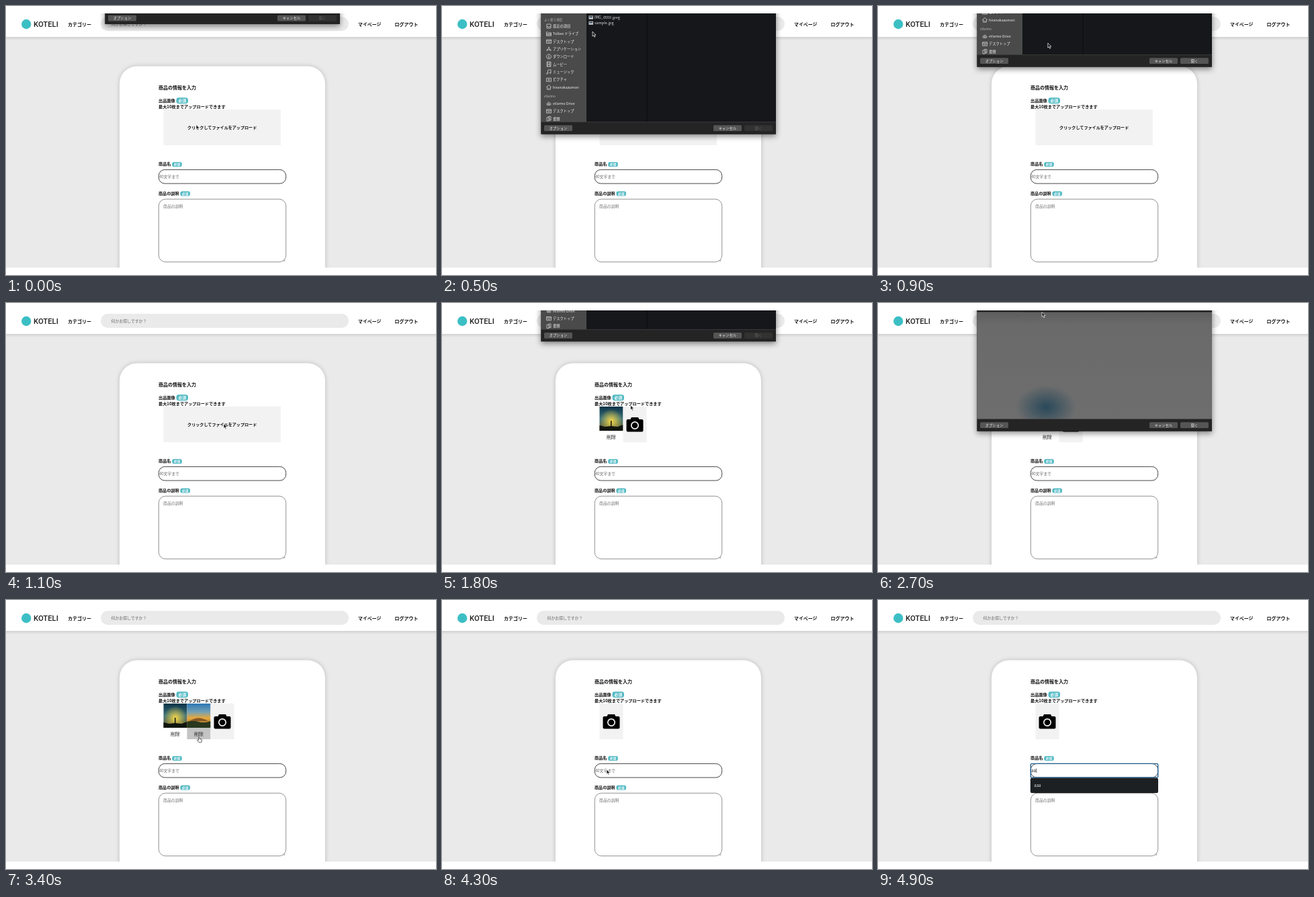
Write an HTML page that moves like this. It is 640 px wide and 400 px high and loops after 5 s.

```html
<!DOCTYPE html>
<html>
<head>
<meta charset="utf-8">
<style>
html, body { margin: 0; width: 100%; height: 100%; overflow: hidden; background: #fff; }
svg { display: block; width: 100vw; height: 100vh; font-family: "Noto Sans CJK JP", "Noto Sans CJK", sans-serif; }
.card { filter: drop-shadow(0 0 3px #0003); }
.sheet { filter: drop-shadow(0 3px 4px #0007); }
.line { fill: none; stroke: #d0d0d0; stroke-width: .8; }
</style>
</head>
<body>
<svg id="stage" viewBox="0 0 640 400"></svg>
<script>
const LOOP = 5000, STEP = 100, CELL = 35, LEFT = 234.5;

const rect = (x, y, w, h, fill, r = 0, more = '') =>
  `<rect x="${x}" y="${y}" width="${w}" height="${h}" rx="${r}" fill="${fill}" ${more}/>`;
// cy is the vertical middle of the glyphs
const text = (x, cy, size, str, fill = '#111', weight = 700, more = '') =>
  `<text x="${x}" y="${cy + size * .38}" font-size="${size}" fill="${fill}" font-weight="${weight}" ${more}>${str}</text>`;
const mid = 'text-anchor="middle"';
const badge = (x, cy, w, h, size) =>
  rect(x, cy - h / 2, w, h, '#52bac4', h * .4) + text(x + w / 2, cy, size, '必須', '#fff', 700, mid);
const group = (id, body, more = '') => `<g id="${id}" ${more}>${body}</g>`;
const button = (x, label, id) => group(id,
  rect(x, 177.3, 42, 8.8, '#555', 1.5) + text(x + 21, 181.7, 5.3, label, '#eee', 500, mid));

const icons = {
  tray: 'M1 1H7V7H1ZM1 4.5H3L3.5 5.5H4.5L5 4.5H7',
  folder: 'M.5 1.5H3L4 2.5H7.5V7H.5ZM1 4H7M1 5.5H7',
  desk: 'M.5 1.5H7.5V6.8H.5ZM.5 3H7.5M2 5H6',
  app: 'M4.5 .8L1 7.2M3.5 .8L7 7.2M.3 5.2H7.7',
  down: 'M4 .5A3.5 3.5 0 1 1 3.99 .5M4 2V6M2.5 4.5L4 6L5.5 4.5',
  film: 'M1 .5H7V7.5H1ZM2.5 .5V7.5M5.5 .5V7.5M2.5 4H5.5',
  music: 'M2.5 6.5V1.5L7 .7V5.5M2.5 6.5A1 1 0 1 1 2.4 6M7 5.5A1 1 0 1 1 6.9 5',
  photo: 'M.5 2H7.5V7H.5ZM2.8 4.5A1.2 1.2 0 1 0 5.2 4.5A1.2 1.2 0 1 0 2.8 4.5',
  home: 'M.3 4.2L4 .8L7.7 4.2M1.5 3.5V7.5H6.5V3.5M4 7.5V5',
  cloud: 'M2 6.3A1.4 1.4 0 0 1 2 3.6A2 2 0 0 1 5.7 3.2A1.6 1.6 0 0 1 6 6.3ZM2 5H6M3 4H5',
  docs: 'M1 2H4V7.3H1ZM3 .8H7V6.3H4M5 2V6'
};
const places = [
  ['tray', '最近の項目'], ['folder', 'Tolbex ドライブ'], ['desk', 'デスクトップ'],
  ['app', 'アプリケーション'], ['down', 'ダウンロード'], ['film', 'ムービー'],
  ['music', 'ミュージック'], ['photo', 'ピクチャ'], ['home', 'hiranokazumori']
];
const cloudPlaces = [['cloud', 'eVarmo Drive'], ['desk', 'デスクトップ'], ['docs', '書類']];
const list = (items, top) => items.map(([icon, label], i) => {
  const y = top + i * 11.32;
  return `<path class="line" d="${icons[icon]}" transform="translate(155 ${y - 4})"/>` +
    text(165, y, 5.25, label, '#f2f2f2', 500);
}).join('');
const file = (y, name) => rect(218.5, y - 2.5, 6.5, 5, '#d8d8d8') + rect(219.2, y - 1.8, 5.1, 2.2, '#456') +
  text(227, y, 5.5, name, '#e4e4e4', 400);

const page =
  rect(0, 46, 640, 343, '#eaeaea') + rect(0, 46, 640, 5, 'url(#edge)') +
  '<circle cx="30.2" cy="27" r="7.2" fill="#3cbfc4"/>' +
  text(41, 27, 11.3, 'KOTELI', '#222', 500, 'font-family="Roboto, sans-serif"') +
  text(92, 27, 7, 'カテゴリー') + rect(141, 16, 369, 21, '#eaeaea', 10.5) +
  text(156.5, 26.6, 5.9, '何かお探しですか？', '#666', 400) +
  text(524, 27, 6.9, 'マイページ') + text(578.5, 27, 7, 'ログアウト') +
  rect(169, 89.5, 306, 340, '#fff', 26, 'class="card"') +
  text(227, 121, 7, '商品の情報を入力') +
  text(227, 140.7, 6.2, '出品画像') + badge(253.5, 140.7, 17.5, 9, 6) +
  text(227, 149.6, 6.17, '最大10枚までアップロードできます') +
  group('upload', rect(LEFT, 154, 174.5, 53, '#f2f2f2') +
    text(321.7, 181, 6.08, 'クリックしてファイルをアップロード', '#111', 700, mid)) +
  ['sunset', 'dusk'].map((name, i) => group('photo' + i,
    rect(0, 190, CELL, 17, '#c4c4c4', 0, `id="hover${i}"`) + scene(name) +
    text(CELL / 2, 199, 7, '削除', '#222', 500, mid),
    `transform="translate(${LEFT + i * CELL})"`)).join('') +
  group('camera', rect(0, 154, CELL, 53, '#f2f2f2') +
    '<path d="M7 173H11L12.5 170H22.5L24 173H28Q30 173 30 175V189.500Q30 191.500 28 191.500H7Q5 191.500 5 189.500V175Q5 173 7 173Z"/>' +
    '<circle cx="17.5" cy="182" r="5.200" stroke="#f2f2f2" stroke-width="1.700"/>') +
  text(227, 235, 6.15, '商品名') + badge(247.3, 235.5, 14.5, 7, 4.8) +
  rect(227.3, 243.4, 189.4, 20.6, '#fff', 9, 'stroke="#333" stroke-width=".9"') +
  text(228, 253.7, 5.85, '40文字まで', '#666', 400, 'id="hint"') +
  text(227, 278.5, 6.1, '商品の説明') + badge(259.5, 279, 14.5, 7, 4.8) +
  rect(227.3, 287.2, 189.4, 93.4, '#fff', 10, 'stroke="#777" stroke-width=".8"') +
  text(234, 298, 5.9, '商品の説明', '#757575', 400) +
  '<path d="M412.500 380L415.500 377M414 380L415.500 378.500" stroke="#777" stroke-width=".6"/>' +
  group('focus', rect(227.3, 243.4, 189.4, 20.6, 'none', 1.5, 'stroke="#24608f" stroke-width="1.4"')) +
  text(228, 253.7, 6, '', '#111', 400, 'id="typed"') +
  rect(0, 250.5, .6, 6.5, '#111', 0, 'id="caret"') +
  group('suggest', rect(226.8, 264.7, 190.2, 22.3, '#1c2022', 2) + text(232.3, 276, 6, 'aaa', '#eee', 400));

const sheet =
  rect(147.5, 0, 349.5, 190.5, '#15171a') + rect(147.5, 0, 67.5, 172.5, '#4a4a4a') +
  rect(304.8, 0, .6, 172, '#08090a') +
  text(152, 20, 4.5, 'よく使う項目', '#bbb', 500) + list(places, 30) +
  text(152, 134.7, 4.7, 'eVarmo', '#bbb', 500) + list(cloudPlaces, 145) +
  group('files', file(17, 'IMG_0559.jpeg') + file(25.2, 'sample.jpg')) +
  group('zoom', rect(147.5, 11, 349.5, 2.5, '#222') + rect(147.5, 13.5, 349.5, 160, 'url(#grey)') +
    rect(205, 108, 90, 65, 'url(#glow)')) +
  rect(147.5, 172.5, 349.5, 18, '#242424') + rect(147.5, 172.3, 349.5, .6, '#484848') +
  button(152, 'オプション', 'option') + button(404, 'キャンセル', 'cancel') + button(450, '開く', 'open');

function scene(name) {
  const sky = rect(0, 154, CELL, 36, `url(#${name})`);
  return name === 'sunset'
    ? sky + rect(0, 154, CELL, 36, 'url(#sun)') +
      '<path fill="#11150f" d="M0 190V182L8 184L16.500 183V175H18V183L27 184L35 181V190Z"/>'
    : sky + '<path fill="#29371f" d="M0 190V181Q9 178 17 181T35 180V190Z"/>' +
      '<path fill="#855724" d="M4 180Q17 171 31 180Z"/>';
}
const gradient = (id, ...stops) => `<linearGradient id="${id}" x2="0" y2="1">` +
  stops.map(([at, color]) => `<stop offset="${at}" stop-color="${color}"/>`).join('') + '</linearGradient>';
const radial = (id, cy, color) => `<radialGradient id="${id}" cy="${cy}"><stop stop-color="${color}"/>` +
  `<stop offset="1" stop-color="${color}" stop-opacity="0"/></radialGradient>`;

stage.innerHTML = '<defs>' +
  gradient('edge', [0, '#d0d0d0'], [1, '#eaeaea']) +
  gradient('grey', [0, '#5e5e5e'], [.12, '#6a6a6a'], [1, '#6e6e6e']) +
  gradient('sunset', [0, '#0b3348'], [.5, '#3c727b'], [1, '#6b5820']) +
  gradient('dusk', [0, '#2d77b5'], [.35, '#75a1b4'], [.6, '#e8a83c'], [1, '#6d5224']) +
  radial('sun', .6, '#f5d648') + radial('glow', .72, '#29495a') + '</defs>' +
  page + group('sheet', sheet, 'class="sheet"') +
  rect(0, 0, 640, 11, '#fff') + rect(0, 389, 640, 11, '#fff') +
  group('pointer',
    '<path id="arrow" fill="#111" stroke="#fff" stroke-width=".7" d="M0 0V7L1.600 5.500L2.800 8.200L4 7.700L2.800 5.100H5Z"/>' +
    '<path id="hand" fill="#fff" stroke="#222" stroke-width=".7" d="M1.500 5V.8Q2.200 -.2 3 .8V3L6 3.700Q6.800 4 6.500 5.500L5.800 8.200H2L-.3 5Q-.2 4 .6 4.400Z"/>');

const $ = id => document.getElementById(id);
const show = (id, on) => $(id).style.display = on ? '' : 'none';
const within = (t, a, b) => t >= a && t < b;

// Linear interpolation over rows of [time, ...values]
function tween(rows, t) {
  const i = rows.findIndex(row => row[0] > t);
  if (i < 0) return rows[rows.length - 1].slice(1);
  const a = rows[i - 1], b = rows[i], p = (t - a[0]) / (b[0] - a[0]);
  return a.slice(1).map((v, k) => v + (b[k + 1] - v) * p);
}

const slide = [[0, -163.5], [300, 0], [800, 0], [1000, -200], [1700, -200], [2000, 0], [2800, 0], [3000, -200]];
const route = [
  [0, 283, 176.5], [150, 283, 176.5], [500, 224, 38], [700, 235, 24], [850, 235, 24],
  [1100, 324, 179.5], [1400, 286, 182], [1700, 286, 182], [2100, 264.5, 62], [2400, 244, 13.5],
  [2800, 244, 13.5], [3300, 285, 203.5], [3500, 285, 203.5], [3700, 251, 201], [3900, 251, 201], [4300, 245, 252]
];

function draw(now) {
  const t = Math.floor(now % LOOP / STEP) * STEP;
  const [dy] = tween(slide, t), [x, y] = tween(route, t);
  const first = within(t, 1200, 3900), second = within(t, 3100, 3600);
  const overDelete = t >= 3200 && y > 190 && y < 207;

  $('sheet').setAttribute('transform', `translate(0 ${dy})`);
  show('sheet', dy > -190);
  show('zoom', within(t, 700, 900) || within(t, 2600, 2900));
  $('files').style.opacity = within(t, 1700, 2200) ? .28 : 1;
  $('open').style.opacity = within(t, 700, 1100) || within(t, 2400, 3100) ? 1 : .3;

  show('upload', t < 1200);
  show('photo0', first);
  show('photo1', second);
  show('hover0', overDelete && x < LEFT + CELL);
  show('hover1', overDelete && x >= LEFT + CELL);
  show('camera', t >= 1200);
  $('camera').setAttribute('transform', `translate(${LEFT + CELL * (first + second)})`);

  const typed = 'a'.repeat((t >= 4700) + (t >= 4900));
  $('typed').textContent = typed;
  $('caret').setAttribute('x', 228.2 + typed.length * 3.4);
  show('caret', t >= 4500);
  show('focus', t >= 4500);
  show('hint', !typed);
  show('suggest', typed);

  $('pointer').setAttribute('transform', `translate(${x} ${y})`);
  show('pointer', t < 4600);
  show('arrow', !overDelete);
  show('hand', overDelete);
}

const start = performance.now();
function tick() {
  draw(performance.now() - start);
  requestAnimationFrame(tick);
}
tick();
</script>
</body>
</html>
```
